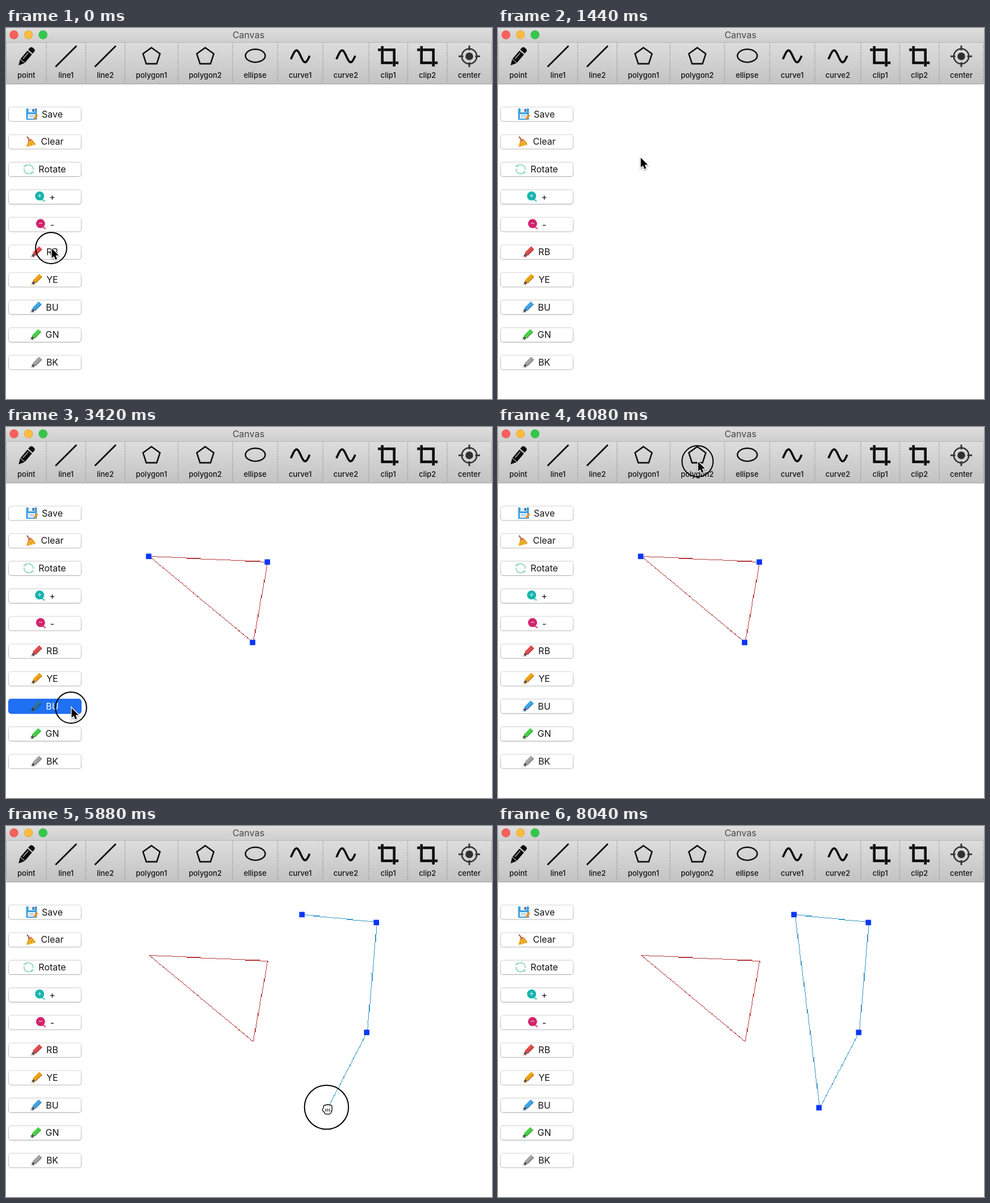
An HTML page with a canvas that plays this animation: 856 by 655 pixels, repeating every 8.1 s.

```html
<!DOCTYPE html>
<html lang="en">
<head>
<meta charset="utf-8">
<title>Canvas</title>
<style>
html, body { margin: 0; width: 100%; height: 100%; overflow: hidden; background: #fff; }
canvas { display: block; }
</style>
</head>
<body>
<canvas id="stage" width="856" height="655"></canvas>
<script>
const ctx = document.getElementById('stage').getContext('2d');
const W = 856, H = 655, LOOP = 8100, STEP = 60, CELL = 1.218;
const HOLD = 120, LEAD = 60, TRAVEL = 660;
const FONT = 'Inter, Roboto, sans-serif';

const click = (t, x, y) => ({ t, x, y });
const red = [click(1500, 251, 228), click(1980, 460, 238), click(2340, 434, 380)];
const blue = [click(4500, 521, 156), click(5040, 652, 170), click(5460, 635, 364), click(5820, 565, 497)];
const closeRed = click(2640, 434, 380), closeBlue = click(6120, 565, 497);

const clicks = [
  click(-60, 80, 388), click(960, 258, 60), ...red, closeRed,
  click(3360, 115, 495), click(4080, 352, 60), ...blue, closeBlue, click(7740, 572, 690)
];
const shapes = [
  { color: '#b4383a', pts: red, close: closeRed.t, idle: blue[0].t },
  { color: '#3795c8', pts: blue, close: closeBlue.t, idle: LOOP }
];

// Toolbar cells: label, icon, width
const tools = [
  ['point', pencil, 70.5], ['line1', slash, 69.5], ['line2', slash, 69],
  ['polygon1', pentagon, 93.5], ['polygon2', pentagon, 96], ['ellipse', oval, 79.5],
  ['curve1', wave, 79.5], ['curve2', wave, 81], ['clip1', crop, 68.5], ['clip2', crop, 69.5],
  ['center', target, 78]
];

const buttons = [
  ['Save', floppy], ['Clear', broom], ['Rotate', arrows],
  ['+', lens('#18b5ae', true)], ['-', lens('#d2246c', false)],
  ['RB', marker('#df4b4b')], ['YE', marker('#eda211')], ['BU', marker('#3fa4e6')],
  ['GN', marker('#48d04a')], ['BK', marker('#a3a3a3')]
];

function rect(color, x, y, w, h) {
  ctx.fillStyle = color;
  ctx.fillRect(x, y, w, h);
}

function line(color, width, ...points) {
  ctx.strokeStyle = color;
  ctx.lineWidth = width;
  ctx.beginPath();
  points.forEach(([x, y]) => ctx.lineTo(x, y));
  ctx.stroke();
}

function disc(color, x, y, r) {
  ctx.fillStyle = color;
  ctx.beginPath();
  ctx.arc(x, y, r, 0, 7);
  ctx.fill();
}

function ring(color, width, x, y, rx, ry = rx, from = 0, to = Math.PI * 2) {
  ctx.strokeStyle = color;
  ctx.lineWidth = width;
  ctx.beginPath();
  ctx.ellipse(x, y, rx, ry, 0, from, to);
  ctx.stroke();
}

function text(str, x, y, size, color, weight = 400) {
  ctx.font = `${weight} ${size}px ${FONT}`;
  ctx.fillStyle = color;
  ctx.textAlign = 'center';
  ctx.fillText(str, x, y);
  return ctx.measureText(str).width;
}

function fade(y0, y1, a, b) {
  const g = ctx.createLinearGradient(0, y0, 0, y1);
  g.addColorStop(0, a);
  g.addColorStop(1, b);
  return g;
}

function at(x, y, drawPart, angle = 0) {
  ctx.save();
  ctx.translate(x, y);
  ctx.rotate(angle);
  drawPart();
  ctx.restore();
}

// Icons, centred on the origin
function floppy() {
  rect('#3b9fe0', -10, -10, 19, 20);
  rect('#e9f1f6', -6, -10, 11, 7);
  rect('#37699b', 1, -9, 3, 5);
  rect('#f3f5f7', -7, 0, 13, 8);
  for (const y of [2.5, 5]) line('#8db5d3', 1, [-5, y], [4, y]);
  line('#f08c28', 3.6, [9.5, 1], [4.5, 9]);
}

function broom() {
  line('#a5623a', 2.2, [-7, -9], [-2, -2]);
  for (let i = 0; i < 6; i++) line(i % 2 ? '#e2981d' : '#f5bc35', 3, [i - 4, -i / 2], [i * 2.8 - 7, 9 - i * 0.7]);
  line('#d64f38', 2, [-5, -1], [1, -4]);
}

function arrows() {
  for (const turn of [0, Math.PI]) {
    at(0, 0, () => {
      ring('#86d3b9', 1.6, 0, 0, 8, 8, 0.6, 3.3);
      line('#86d3b9', 1.6, [5, 8.5], [6.5, 4.5], [9.5, 6]);
    }, turn);
  }
}

function lens(color, plus) {
  return () => {
    ctx.globalAlpha = 0.65;
    line(color, 3, [4, 4], [9.5, 8]);
    ctx.globalAlpha = 1;
    disc(color, 0.5, -1.5, 8);
    line('#e3f3f2', 1, [-2.5, -2], [3.5, -2]);
    if (plus) line('#e3f3f2', 1, [0.5, -5], [0.5, 1]);
  };
}

function marker(color) {
  return () => {
    line(color, 1, [-10, 8.5], [-3, 8.5]);
    line('#5c5055', 4.5, [-7, 7.5], [-3, 3]);
    line(color, 7.5, [-4, 4], [7.5, -7.5]);
    line('rgba(0,0,0,.2)', 2, [-2, 6.5], [9.5, -5]);
  };
}

function pencil() {
  at(0, 0, () => {
    rect('#0b0b0b', -10, -5, 19, 10.5);
    ctx.beginPath();
    ctx.roundRect(11, -5, 8, 10.5, [0, 4, 4, 0]);
    ctx.moveTo(-11, -5);
    ctx.lineTo(-21, 0);
    ctx.lineTo(-11, 5.5);
    ctx.fill();
    line('#d3d3d3', 1.2, [-7, -1.5], [7, -1.5]);
  }, -0.87);
}

function slash() {
  line('#0b0b0b', 2.9, [-18.5, 18.5], [18.5, -18.5]);
}

function pentagon() {
  ctx.strokeStyle = '#111';
  ctx.lineWidth = 2.6;
  ctx.beginPath();
  for (let i = 0; i < 5; i++) {
    const a = i * Math.PI * 0.4 - Math.PI / 2;
    ctx.lineTo(15.7 * Math.cos(a), 0.4 + 15.7 * Math.sin(a));
  }
  ctx.closePath();
  ctx.stroke();
}

function oval() {
  ring('#111', 2.5, 0.4, -1, 17.4, 11.4);
}

function wave() {
  const pts = Array.from({ length: 41 }, (_, i) => [i * 0.83 - 16.6, -10.5 * Math.sin(i * 0.172 - 0.5)]);
  line('#0b0b0b', 3.7, ...pts);
}

function crop() {
  for (const turn of [0, Math.PI]) {
    at(0, 0, () => {
      line('#080808', 4.6, [-10.5, -18], [-10.5, 11.5], [8, 11.5]);
      line('#080808', 4.6, [13, 11.5], [18, 11.5]);
    }, turn);
  }
}

function target() {
  ring('#303030', 2.5, 0, 0, 13.2);
  disc('#303030', 0, 0, 6.8);
  for (let i = 0; i < 4; i++) at(0, 0, () => line('#303030', 2.8, [10.5, 0], [19, 0]), i * Math.PI / 2);
}

function toolbar() {
  rect(fade(0, 25, '#dedede', '#cfcfcf'), 0, 0, W, 25);
  rect('#b4b4b4', 0, 25, W, 1);
  rect(fade(26, 98, '#dddddd', '#c3c3c3'), 0, 26, W, 73);
  rect('#a1a1a1', 0, 98, W, 1.3);
  ['#fc605b', '#fdbc40', '#34c84a'].forEach((color, i) => {
    disc(color, 14 + i * 25.6, 12, 7.7);
    ring('rgba(0,0,0,.13)', 0.8, 14 + i * 25.6, 12, 7.4);
  });
  text('Canvas', 427, 17.8, 16, '#484848');
  let x = 0.5;
  for (const [name, icon, width] of tools) {
    seam(x);
    at(x + width / 2, 50, icon);
    text(name, x + width / 2, 88.3, 13, '#111', 500);
    x += width;
  }
  seam(x);
}

function seam(x) {
  ctx.setLineDash([1.3, 2.2]);
  line('#777', 1.2, [x, 27], [x, 97]);
  ctx.setLineDash([]);
}

function sideButtons(t) {
  buttons.forEach(([label, icon], i) => {
    const y = 139 + i * 48.7;
    const on = label === 'BU' && t >= 3360 && t < 3360 + HOLD;
    ctx.beginPath();
    ctx.roundRect(4.5, y + 0.5, 128, 25.5, 4.5);
    ctx.fillStyle = on ? '#1f70f2' : '#fff';
    ctx.fill();
    ctx.strokeStyle = on ? '#1a66e2' : fade(y, y + 26, '#d6d6d6', '#b5b5b5');
    ctx.lineWidth = 1.1;
    ctx.stroke();
    const width = text(label, 81.5, y + 18.7, 16, on ? '#fff' : '#151515');
    ctx.filter = on ? 'brightness(.7)' : 'none';
    at(81.5 - width / 2 - 17.5, y + 13, icon);
    ctx.filter = 'none';
  });
}

// Stepped line on an enlarged pixel grid
function steps(a, b, color) {
  const grid = v => Math.round(v / CELL), edge = n => Math.round(n * CELL);
  const [x0, y0, x1, y1] = [a.x + 1, a.y - 0.5, b.x + 1, b.y - 0.5].map(grid);
  const n = Math.max(Math.abs(x1 - x0), Math.abs(y1 - y0));
  for (let i = 0; i <= n; i++) {
    const x = Math.round(x0 + (x1 - x0) * i / n), y = Math.round(y0 + (y1 - y0) * i / n);
    rect(color, edge(x), edge(y), edge(x + 1) - edge(x), edge(y + 1) - edge(y));
  }
}

function drawShape({ color, pts, close, idle }, t) {
  const shown = pts.filter(p => t >= p.t);
  for (let i = 1; i < shown.length; i++) steps(shown[i - 1], shown[i], color);
  if (t >= close) steps(pts[pts.length - 1], pts[0], color);
  if (t >= idle) return;
  for (const p of shown) {
    if (t >= p.t + HOLD) rect('#0a37f2', p.x - 4.5, p.y - 4.4, 9.6, 9.6);
  }
}

function pointerAt(t) {
  const i = clicks.findIndex(c => c.t > t);
  if (i < 0) return clicks[clicks.length - 1];
  const a = clicks[i - 1], b = clicks[i], end = b.t - LEAD;
  const start = Math.max(a.t + HOLD, end - TRAVEL);
  const u = Math.min(1, Math.max(0, (t - start) / (end - start)));
  const e = u * u * (3 - 2 * u);
  return { x: a.x + (b.x - a.x) * e, y: a.y + (b.y - a.y) * e };
}

function arrow() {
  ctx.beginPath();
  [[0.5, 1], [0.5, 18.3], [4.4, 14.7], [7, 21], [10, 19.7], [7.4, 13.6], [12.8, 13.4]]
    .forEach(([x, y]) => ctx.lineTo(x, y));
  ctx.closePath();
  ctx.strokeStyle = '#fff';
  ctx.lineWidth = 2.6;
  ctx.shadowColor = 'rgba(0,0,0,.35)';
  ctx.shadowBlur = 3;
  ctx.shadowOffsetY = 1.5;
  ctx.stroke();
  ctx.shadowColor = 'transparent';
  ctx.fillStyle = '#000';
  ctx.fill();
}

function hand() {
  ctx.beginPath();
  ctx.roundRect(-8, -1, 7, 6, 3);
  ctx.roundRect(-5, 0, 11, 9, 3);
  for (let i = 0; i < 4; i++) ctx.roundRect(i * 3.3 - 6, Math.abs(i - 1.5) - 7, 3.6, 10, 1.8);
  ctx.strokeStyle = '#000';
  ctx.lineWidth = 2.6;
  ctx.stroke();
  ctx.fillStyle = '#fff';
  ctx.fill();
  for (let i = 0; i < 3; i++) line('#000', 1.1, [i * 3 - 2.5, 0], [i * 3 - 2.5, 5]);
}

function pointer(t) {
  const { x, y } = pointerAt(t);
  const pressed = clicks.some(c => t >= c.t && t < c.t + HOLD);
  const grab = pressed && x > 140 && y > 100;
  if (pressed) ring('#000', 2, x - 0.5, y + (grab ? -0.5 : 0.5), grab ? 38.8 : 27.4);
  if (grab) at(x + 1, y + 2, hand);
  else at(x, y, arrow);
}

function draw(t) {
  rect('#fff', 0, 0, W, H);
  toolbar();
  sideButtons(t);
  shapes.forEach(s => drawShape(s, t));
  pointer(t);
}

const start = performance.now();
function frame(now) {
  const t = Math.max(0, now - start) % LOOP;
  draw(Math.floor(t / STEP) * STEP);
  requestAnimationFrame(frame);
}
draw(0);
requestAnimationFrame(frame);
</script>
</body>
</html>
```
